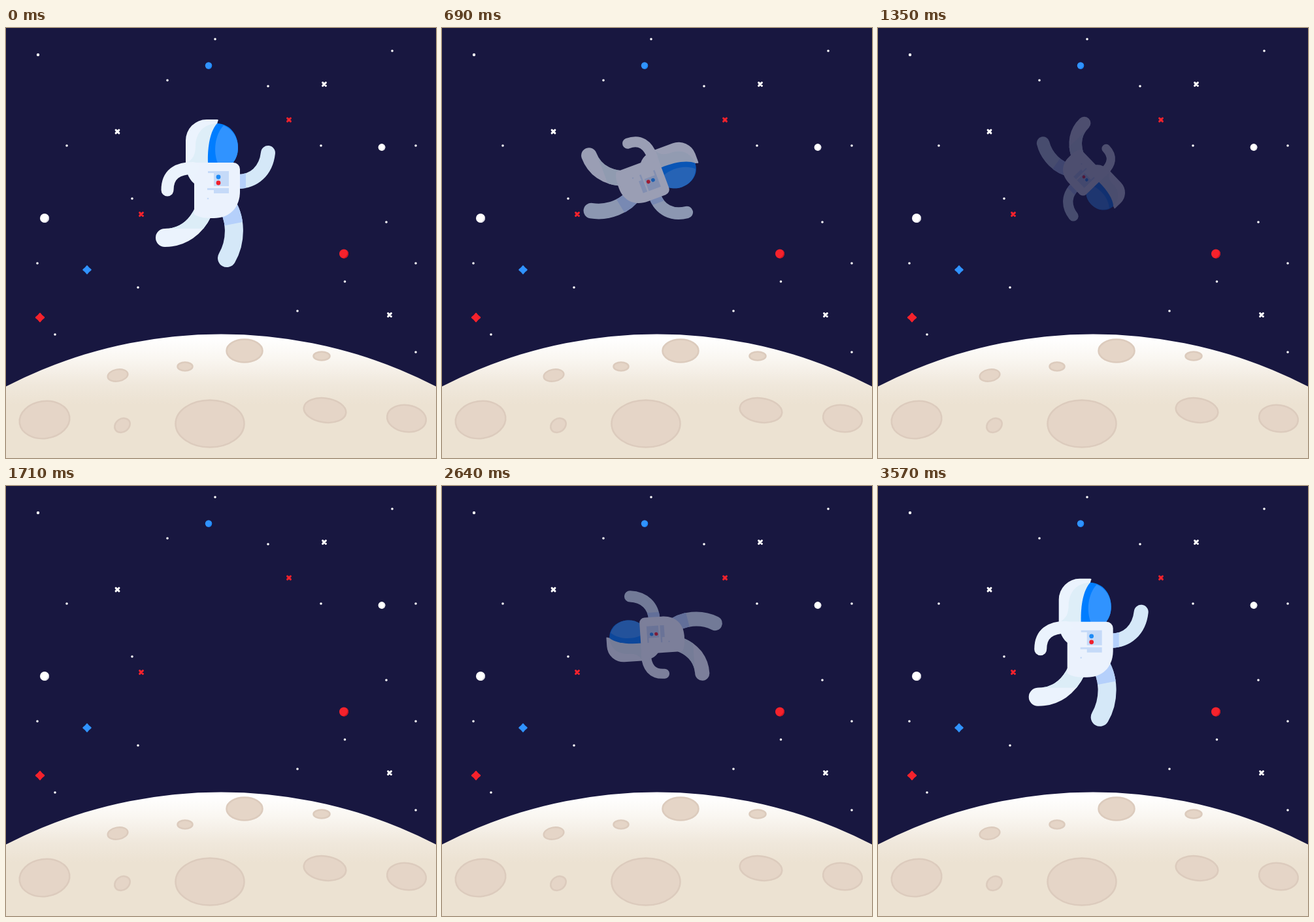
An HTML page for the animation above (3.6 s loop, 658 by 658 pixels).

```html
<!DOCTYPE html>
<html lang="en">
<head>
<meta charset="utf-8">
<title>Drifting astronaut</title>
<style>
  html, body { margin: 0; width: 100%; height: 100%; overflow: hidden; background: #181740; }
  svg { display: block; width: 100%; height: 100%; }
  .limb { fill: none; stroke-linecap: round; }
</style>
</head>
<body>
<svg viewBox="0 0 658 658">
  <defs>
    <linearGradient id="ground" gradientUnits="userSpaceOnUse" x1="0" y1="474" x2="0" y2="576">
      <stop offset="0" stop-color="#fff"/>
      <stop offset=".3" stop-color="#faf7f2"/>
      <stop offset=".7" stop-color="#f0e8dc"/>
      <stop offset="1" stop-color="#ece2d2"/>
    </linearGradient>
    <clipPath id="thigh"><path d="M310 250H380V293.500L310 307Z"/></clipPath>
    <clipPath id="cuff"><path d="M350 215H367V255H350Z"/></clipPath>
    <clipPath id="shade"><path d="M220 270H330V307H220Z"/></clipPath>
  </defs>
  <rect width="658" height="658" fill="#181740"/>
  <g id="sky"></g>
  <circle cx="329" cy="1184.500" r="716" fill="url(#ground)"/>
  <g id="craters" fill="#e5d5c7" stroke="#dccbbd" stroke-width="2.500"></g>

  <g id="astronaut">
    <!-- legs -->
    <g class="limb" stroke-width="28">
      <path d="M302 281C290 306 270 321 243 321" stroke="#ebf3fd"/>
      <path d="M302 281C290 306 270 321 243 321" stroke="#dcedf7" clip-path="url(#shade)"/>
      <path d="M335 266C353 290 353 326 338 352" stroke="#d5e8f8"/>
      <path d="M335 266C353 290 353 326 338 352" stroke="#b5d0fb" clip-path="url(#thigh)"/>
    </g>
    <!-- waving arm -->
    <g class="limb" stroke-width="22">
      <path d="M352 235C380 236 398 218 401 191" stroke="#d5e8f8"/>
      <path d="M352 235C380 236 398 218 401 191" stroke="#b5d0fb" clip-path="url(#cuff)"/>
    </g>
    <!-- helmet -->
    <path d="M275 172A32 32 0 0 1 307 140H323Q326 140 324 143L309 206L300 240H291C281 234 275 222 275 206Z" fill="#ebf3fd"/>
    <path d="M323 146C302 147 291 160 290 180C290 194 286 201 277 206H312Z" fill="#deeef8"/>
    <path d="M323 146C343 147 355 163 355 183C355 193 352 200 347 207H309C308 180 313 157 323 146Z" fill="#007dff"/>
    <path d="M333 149C347 155 355 168 355 183C355 193 352 200 347 207H324C317 190 319 164 333 149Z" fill="#3093ff"/>
    <!-- torso -->
    <path d="M288 206H348A10 10 0 0 1 358 216V250C358 275 342 291 318 291C304 291 295 290 288 285Z" fill="#ebf2fd"/>
    <path class="limb" d="M286 214.500C262 214.500 247 224 247 248" stroke="#ebf3fd" stroke-width="19"/>
    <g fill="#c5daf8">
      <path d="M309 219H341V242H318V222H309ZM308 245H341V253H318V248H308Z"/>
      <circle cx="309" cy="261" r="1.300"/>
    </g>
    <circle cx="325" cy="228" r="3.400" fill="#1f8bf5"/>
    <circle cx="325" cy="237" r="3.400" fill="#f0202c"/>
  </g>
</svg>
<script>
const NS = 'http://www.w3.org/2000/svg';
const sky = document.getElementById('sky');
const astronaut = document.getElementById('astronaut');

function add(parent, tag, attrs) {
  const el = document.createElementNS(NS, tag);
  for (const key in attrs) el.setAttribute(key, attrs[key]);
  parent.append(el);
}

const WHITE = '#fff', BLUE = '#3093ff', RED = '#f5222c';

const stars = [
  [49, 41], [320, 17], [591, 35], [247, 80], [401, 89], [93, 180], [482, 180], [627, 180], [193, 261],
  [582, 297], [48, 360], [627, 360], [202, 397], [518.5, 388], [446, 433], [75, 469], [627, 496]
];
stars.forEach(([cx, cy], i) => add(sky, 'circle', { cx, cy, r: i ? 1.8 : 2.2, fill: WHITE }));

const planets = [
  [575, 182.5, 5.4, WHITE, '#d5d5df'], [59, 291, 7, WHITE, '#d5d5df'],
  [310, 57.5, 5.2, BLUE, '#1784fa'], [517, 345.5, 7, RED, '#c9121f']
];
for (const [x, y, r, fill, dark] of planets) {
  add(sky, 'circle', { cx: x, cy: y, r, fill });
  const k = r * 0.7;
  add(sky, 'path', { d: `M${x + k} ${y - k}A${r} ${r} 0 0 1 ${x - k * 0.3} ${y + r * 0.97}A${r * 1.2} ${r * 1.2} 0 0 0 ${x + k} ${y - k}Z`, fill: dark });
}

const crosses = [[487, 86, WHITE], [170.5, 158.5, WHITE], [587, 439, WHITE], [433, 140.5, RED], [207, 285, RED]];
for (const [x, y, stroke] of crosses)
  add(sky, 'path', { d: `M${x - 2.4} ${y - 2.4}l4.8 4.8m0 -4.8l-4.8 4.8`, stroke, 'stroke-width': 3, 'stroke-linecap': 'round' });

const sparkles = [[124, 370, 5.5, BLUE], [52, 443, 6, RED]];
for (const [x, y, r, fill] of sparkles) {
  const q = r * 0.45;
  add(sky, 'path', {
    d: `M${x} ${y - r}L${x + q} ${y - q}L${x + r} ${y}L${x + q} ${y + q}L${x} ${y + r}L${x - q} ${y + q}L${x - r} ${y}L${x - q} ${y - q}Z`,
    fill, stroke: fill, 'stroke-width': 2.4, 'stroke-linejoin': 'round'
  });
}

const craters = [
  [365, 494, 27.5, 17.5, 0], [483, 502, 12.5, 6.5, 0], [274, 518, 11.5, 6.5, 0],
  [171, 531.5, 15.5, 9, -10], [59, 599.5, 38.5, 28.5, -8], [178, 608, 12.5, 10, -35],
  [312, 605.5, 52.5, 36, 0], [488, 585, 32.5, 18.5, 8], [613, 597.5, 30, 20.5, 8]
];
for (const [cx, cy, rx, ry, turn] of craters)
  add(document.getElementById('craters'), 'ellipse', { cx, cy, rx, ry, transform: `rotate(${turn} ${cx} ${cy})` });

const LOOP = 3600, STEP = 30, LAST = LOOP - STEP, MID = 1800;
const PIVOT = [320.5, 229];

function draw(now) {
  const t = Math.floor((now % LOOP) / STEP) * STEP;
  const p = t / LAST;
  // near is 1 at both ends and 0 in the middle of the loop
  const near = t < MID ? 1 - t / MID : (t - MID) / (LAST - MID);
  const x = PIVOT[0] + 1.7 * p, y = PIVOT[1] + 1.8 * p;
  astronaut.setAttribute('transform',
    `translate(${x} ${y}) rotate(${360 * p}) scale(${0.6 + 0.4 * near}) translate(${-PIVOT[0]} ${-PIVOT[1]})`);
  astronaut.setAttribute('opacity', near < 0.06 ? 0 : near);
}

let start;
function tick(now) {
  start ??= now;
  draw(now - start);
  requestAnimationFrame(tick);
}
draw(0);
requestAnimationFrame(tick);
</script>
</body>
</html>
```
